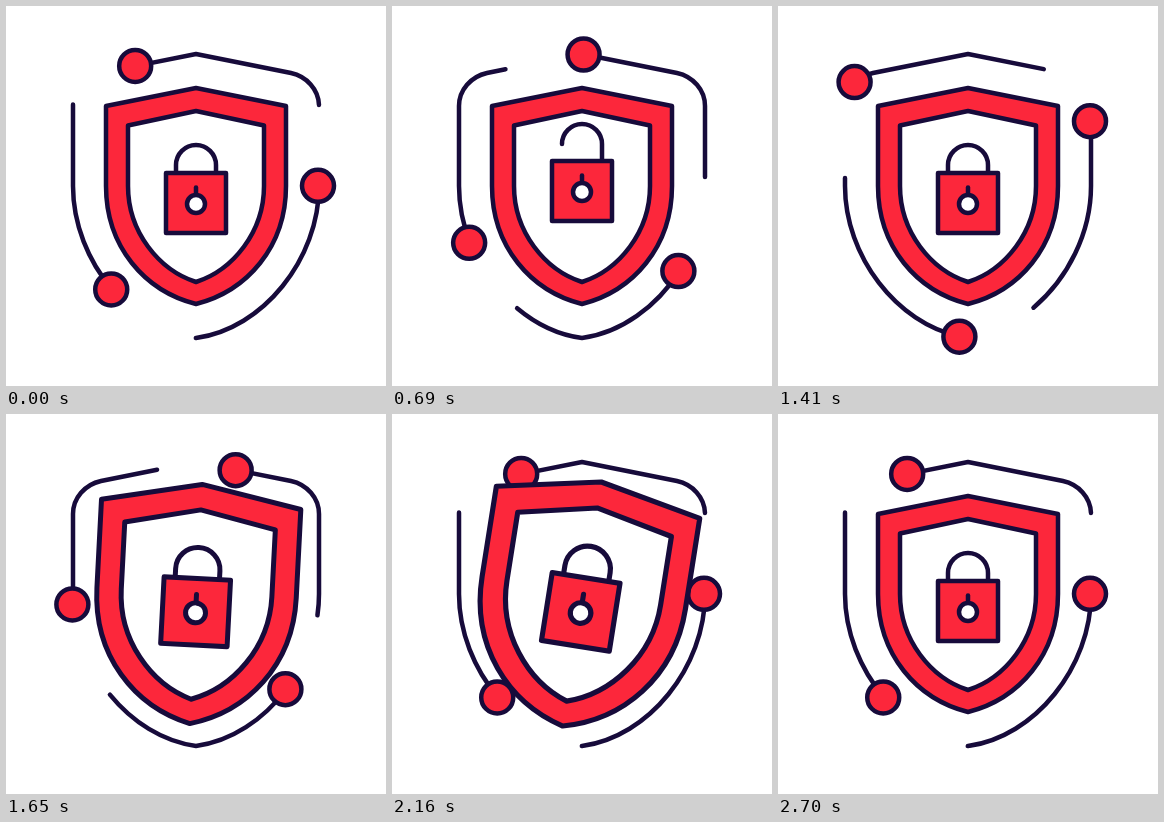
These frames come from a looping animation (380x380 px, 3900 ms). An HTML page:

```html
<!DOCTYPE html>
<html lang="en">
<head>
<meta charset="utf-8">
<title>Shield and lock</title>
<style>
  html, body { margin: 0; width: 100%; height: 100%; overflow: hidden; background: #fff; }
  svg { display: block; width: 100vw; height: 100vh; }
  .ink { stroke: #170b3b; stroke-width: 4.5; stroke-linecap: round; stroke-linejoin: round; fill: none; }
  .red { fill: #fc273b; }
  .white { fill: #fff; }
</style>
</head>
<body>
<svg viewBox="0 0 380 380">
  <g id="orbit" class="ink"></g>
  <g id="shield" class="ink">
    <path class="red" d="M190 82L280 100V180C280 241 241 285 190 298C139 285 100 241 100 180V100Z"/>
    <path class="white" d="M190 105L258 119.5V180C258 226 227 264 190 276C153 264 122 226 122 180V119.5Z"/>
    <g id="lock">
      <path id="shackle"/>
      <rect class="red" x="160" y="167" width="60" height="60"/>
      <path d="M190 181.5V189"/>
      <circle class="white" cx="190" cy="198" r="9"/>
    </g>
  </g>
</svg>
<script>
const LOOP = 3900, SPIN = 2100;
const RING = 'M190 48L285 67C301 70.5 313 84 313 100V180C313 253 257 323 190 332' +
             'C123 323 67 253 67 180V100C67 84 79 70.5 95 67Z';

// Rows of [time, value], eased between neighbours
const LIFT = [[30, 0], [660, 12], [700, 12], [1267, 0]];
const OPEN = [[330, 0], [660, 1], [700, 1], [1033, 0]];
const TURN = [[1500, 0], [2033, 15.2], [2400, -7], [2700, 0]];
const SIZE = [[1500, 1], [1900, 1.34], [2400, 0.972], [2700, 1]];

const $ = id => document.getElementById(id);
const ease = x => x * x * (3 - 2 * x);

function at(track, t) {
  if (t <= track[0][0]) return track[0][1];
  for (let i = 1; i < track.length; i++) {
    const [a, from] = track[i - 1], [b, to] = track[i];
    if (t < b) return from + (to - from) * ease((t - a) / (b - a));
  }
  return track[track.length - 1][1];
}

function add(name, attrs) {
  const el = document.createElementNS('http://www.w3.org/2000/svg', name);
  for (const key in attrs) el.setAttribute(key, attrs[key]);
  return $('orbit').appendChild(el);
}

const lines = [0, 1, 2].map(() => add('path', { d: RING }));
const dots = [0, 1, 2].map(() => add('circle', { r: 16, class: 'red' }));
const ring = lines[0], total = ring.getTotalLength();

// Start and end of each trail, measured clockwise from the top
const trails = [
  [223.5, total / 2],
  [total / 2 + 99, total - 142.5],
  [total - 61, total + 142.5]
];
trails.forEach(([a, b], i) =>
  lines[i].setAttribute('stroke-dasharray', `${b - a} ${total - b + a}`));

function draw(t) {
  const travel = total * ease(Math.min(t / SPIN, 1));
  trails.forEach(([a], i) => {
    const pos = (a - travel + 2 * total) % total;
    const p = ring.getPointAtLength(pos);
    lines[i].setAttribute('stroke-dashoffset', -pos);
    dots[i].setAttribute('cx', p.x - 1);
    dots[i].setAttribute('cy', p.y);
  });

  const open = at(OPEN, t), y = 159 - 9 * open;
  $('shackle').setAttribute('d', `M170 ${y + 8 * (1 - open)}V${y}A20 20 0 0 1 210 ${y}V167`);
  $('lock').setAttribute('transform', `translate(0 ${-at(LIFT, t)})`);
  $('shield').setAttribute('transform',
    `translate(190 190) rotate(${at(TURN, t)}) scale(${at(SIZE, t)}) translate(-190 -190)`);
}

const start = performance.now();
function tick() {
  draw((performance.now() - start) % LOOP);
  requestAnimationFrame(tick);
}
draw(0);
requestAnimationFrame(tick);
</script>
</body>
</html>
```
